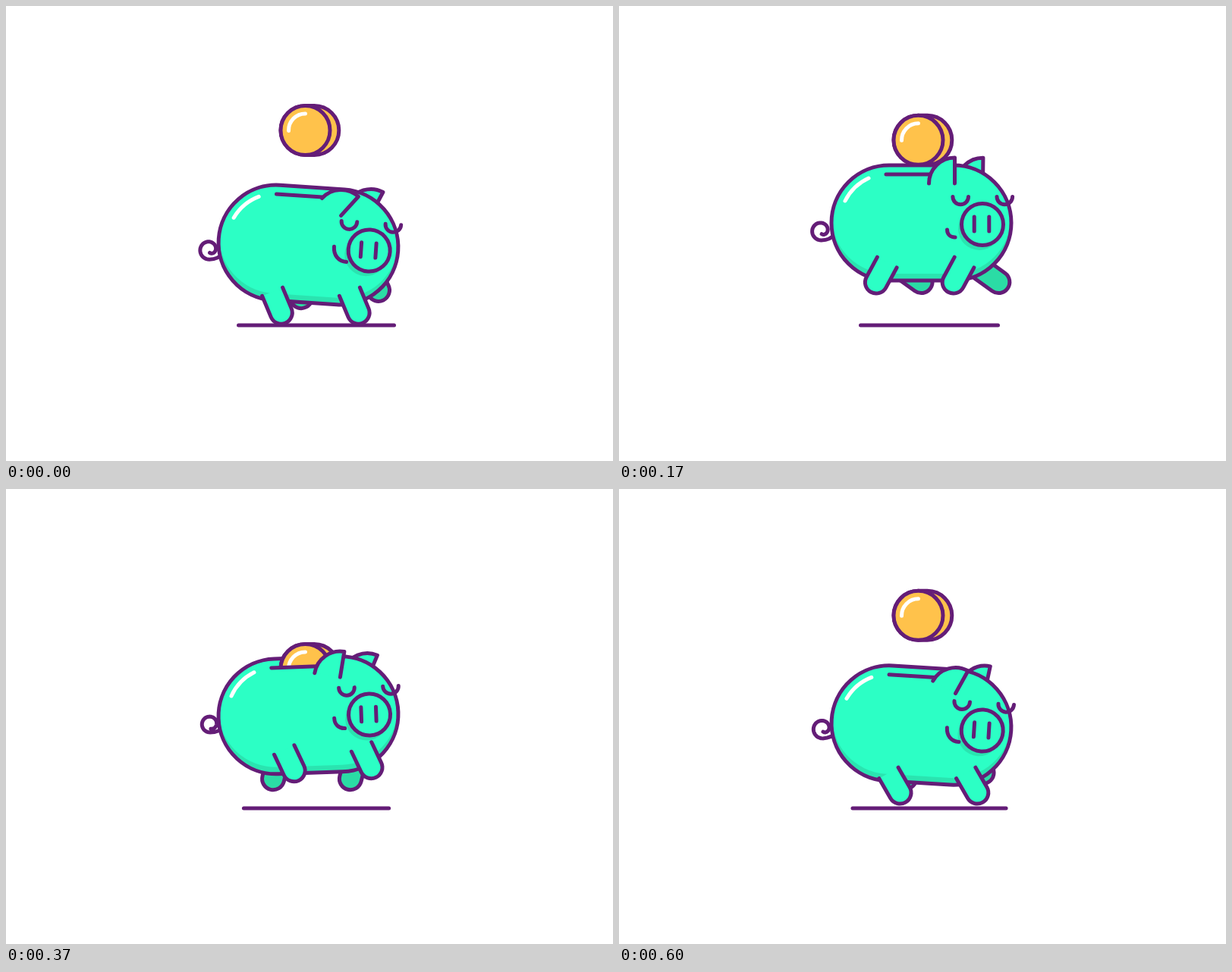
Animation of 800x600 px, one loop 630 ms. Source, as an HTML page with a canvas:

```html
<!DOCTYPE html>
<html lang="en">
<head>
<meta charset="utf-8">
<title>Piggy bank</title>
<style>
html, body { margin: 0; width: 100%; height: 100%; overflow: hidden; background: #fff; }
canvas { display: block; width: 800px; height: 600px; }
</style>
</head>
<body>
<canvas id="stage" width="800" height="600"></canvas>
<script>
const ctx = document.getElementById('stage').getContext('2d');
const LOOP = 630, LANDING = 284, RAD = Math.PI / 180;
const INK = '#641d77', MINT = '#2cffc5', SHADE = '#2ae4b0', DEEP = '#2bdca5', GOLD = '#ffc24b';
const { sin, cos, min, max, PI } = Math;

const capsule = (r, a, b) =>
  `M${a} ${-r}H${b}A${r} ${r} 0 0 1 ${b} ${r}H${a}A${r} ${r} 0 0 1 ${a} ${-r}Z`;
const disc = (x, y, r) =>
  `M${x - r} ${y}a${r} ${r} 0 1 1 ${2 * r} 0a${r} ${r} 0 1 1 ${-2 * r} 0Z`;
const eye = x => `M${x - 10.3} -34.5a10.3 10.3 0 0 0 20.6 0`;
const leg = len => `M-14.6 ${-len}V0A14.6 14.6 0 0 0 14.6 0V${-len}`;

const SHAPE = {
  body: new Path2D(capsule(76, -42.5, 42.5)),
  gleam: new Path2D('M-100.5 -29A65 65 0 0 1 -69.5 -59'),
  slot: new Path2D('M-46.5 -64H14'),
  eyes: new Path2D(eye(51.7) + eye(109.8)),
  snoutShade: new Path2D(disc(76.5, 8, 28)),
  snout: new Path2D(disc(80.5, 2, 27.5)),
  nostrils: new Path2D('M69.7 -8V11M89.3 -8V11'),
  ear: new Path2D('M-17 0A34 34 0 0 1 17 -34V0'),
  leg: new Path2D(leg(30)),
  farLeg: new Path2D(leg(45)),
  coinEdge: new Path2D(capsule(32.5, 0, 11.8)),
  coinFace: new Path2D(disc(0, 0, 32.5)),
  coinGleam: new Path2D('M-22 .5A22 22 0 0 1 0 -22'),
  aboveSlot: new Path2D('M-200 -500H200V-64H-200Z')
};

// About 30 poses a second, with the first pose of each odd tenth held back
function hold(t) {
  const tenth = Math.floor(t / 100), r = t % 100;
  return tenth * 100 + (r >= 70 ? 70 : r >= 30 ? 30 : tenth % 2 ? -30 : 0);
}

// 1 on the ground, 0 at the top of a hop: springs up, then drops
const APEX = 0.6;
function crouch(u) {
  u -= Math.floor(u);
  if (u < APEX) return (1 - u / APEX) ** 1.6;
  const s = (u - APEX) / (1 - APEX);
  return s * s * (3 - 2 * s);
}

// Two hops per loop, one stride of the legs
function pose(t) {
  const first = t < LANDING;
  const u = first ? t / LANDING : (t - LANDING) / (LOOP - LANDING);
  const a = 2 * PI * t / LOOP;
  const c = crouch(u), swing = sin(a + 0.07), push = c * (1 + cos(a));
  const y = 315 - 29 * (1 - c);
  const tilt = 3.9 * c ** 0.75 * (first === u < APEX ? 1 : -1);
  return {
    c, y, tilt,
    ground: 90.5 + 12 * c,
    coin: 164 + (first ? 100 * u ** 4 : 112 * (1 - u) ** 1.5),
    ear: 40 * crouch(u - 0.035) ** 1.8,
    farEar: 44 * crouch(u - 0.14) ** 1.8,
    near: {
      x: 364.5 - 26 * swing, y: y + 79.5 + 1.5 * c + 8.5 * cos(a),
      turn: 34 * swing - 5 - 10 * push, rise: 2 * min(0, tilt)
    },
    far: {
      x: 369 + 30 * swing + 9 * push, y: y + 77 - 8 * cos(a),
      turn: -44 * swing - 11 - 6 * push, rise: -2.3 * push * push
    },
    tail: {
      x: 266 - 1.5 * sin(a),
      y: y + 6 - 133.5 * sin(tilt * RAD) + 10 * c + 5 * sin(a),
      whip: max(0, -cos(a + 0.25)) ** 3
    }
  };
}

function paint(path, fill, stroke = INK) {
  if (fill) { ctx.fillStyle = fill; ctx.fill(path); }
  if (stroke) { ctx.strokeStyle = stroke; ctx.stroke(path); }
}

function at(x, y, deg, draw) {
  ctx.save();
  ctx.translate(x, y);
  ctx.rotate(deg * RAD);
  draw();
  ctx.restore();
}

function drawLegs(path, { x, y, turn, rise }, fill) {
  at(x, y, turn, () => paint(path, fill));
  at(x + 101.8, y + rise, turn, () => paint(path, fill));
}

function drawEar(x, deg) {
  at(x, -52, deg, () => paint(SHAPE.ear, MINT));
}

// A spiral that uncoils into an open loop
function drawTail({ x, y, whip }) {
  const cx = 2 + whip / 2, cy = -1.5 * whip, r = 12.3 - 4.5 * whip;
  const path = new Path2D();
  path.moveTo(20 + 2 * whip, 4 - 5 * whip);
  path.quadraticCurveTo(14, 12 - 5 * whip, cx, cy + r);
  for (let k = 0; k <= 1; k += 1 / 40) {
    const d = r + (13 * whip - 9.5) * k ** 3, b = PI / 2 + 2 * PI * k;
    path.lineTo(cx + d * cos(b), cy + d * sin(b));
  }
  at(x, y, 0, () => paint(path));
}

function drawBody(p) {
  drawEar(64, p.farEar);
  paint(SHAPE.body, SHADE, null);
  ctx.save();
  ctx.clip(SHAPE.body);
  at(0, -9, 0, () => paint(SHAPE.body, MINT, null));
  paint(SHAPE.snoutShade, SHADE, null);
  ctx.restore();
  paint(SHAPE.body);
  paint(SHAPE.gleam, null, '#fff');
}

function drawCoin() {
  paint(SHAPE.coinEdge, GOLD);
  paint(SHAPE.coinFace, GOLD);
  paint(SHAPE.coinGleam, null, '#fff');
}

function drawFace(p) {
  paint(SHAPE.slot);
  drawEar(27, p.ear);
  paint(SHAPE.eyes);
  const top = 9 - 9 * p.c, end = 44.5 + 7 * p.c;
  paint(new Path2D(
    `M34 ${top}C34 ${top + (19 - top) * 0.6} ${34 + (end - 34) * 0.4} 19 ${end} 19`));
  paint(SHAPE.snout, MINT);
  paint(SHAPE.nostrils);
}

function draw(t) {
  const p = pose(t);
  const inPig = fn => at(398.5, p.y, p.tilt, fn);

  ctx.fillStyle = '#fff';
  ctx.fillRect(0, 0, 800, 600);
  ctx.lineWidth = 5;
  ctx.lineCap = ctx.lineJoin = 'round';

  paint(new Path2D(`M${409 - p.ground} 421H${409 + p.ground}`));
  drawLegs(SHAPE.farLeg, p.far, DEEP);
  drawTail(p.tail);
  inPig(() => drawBody(p));
  drawLegs(SHAPE.leg, p.near, MINT);

  // The coin shows only above the slot
  const above = new Path2D();
  above.addPath(SHAPE.aboveSlot, new DOMMatrix().translate(398.5, p.y).rotate(p.tilt));
  ctx.save();
  ctx.clip(above);
  at(394.5, p.coin, 0, drawCoin);
  ctx.restore();

  inPig(() => drawFace(p));
}

const start = performance.now();
function tick() {
  draw(hold((performance.now() - start) % LOOP));
  requestAnimationFrame(tick);
}
tick();
</script>
</body>
</html>
```
